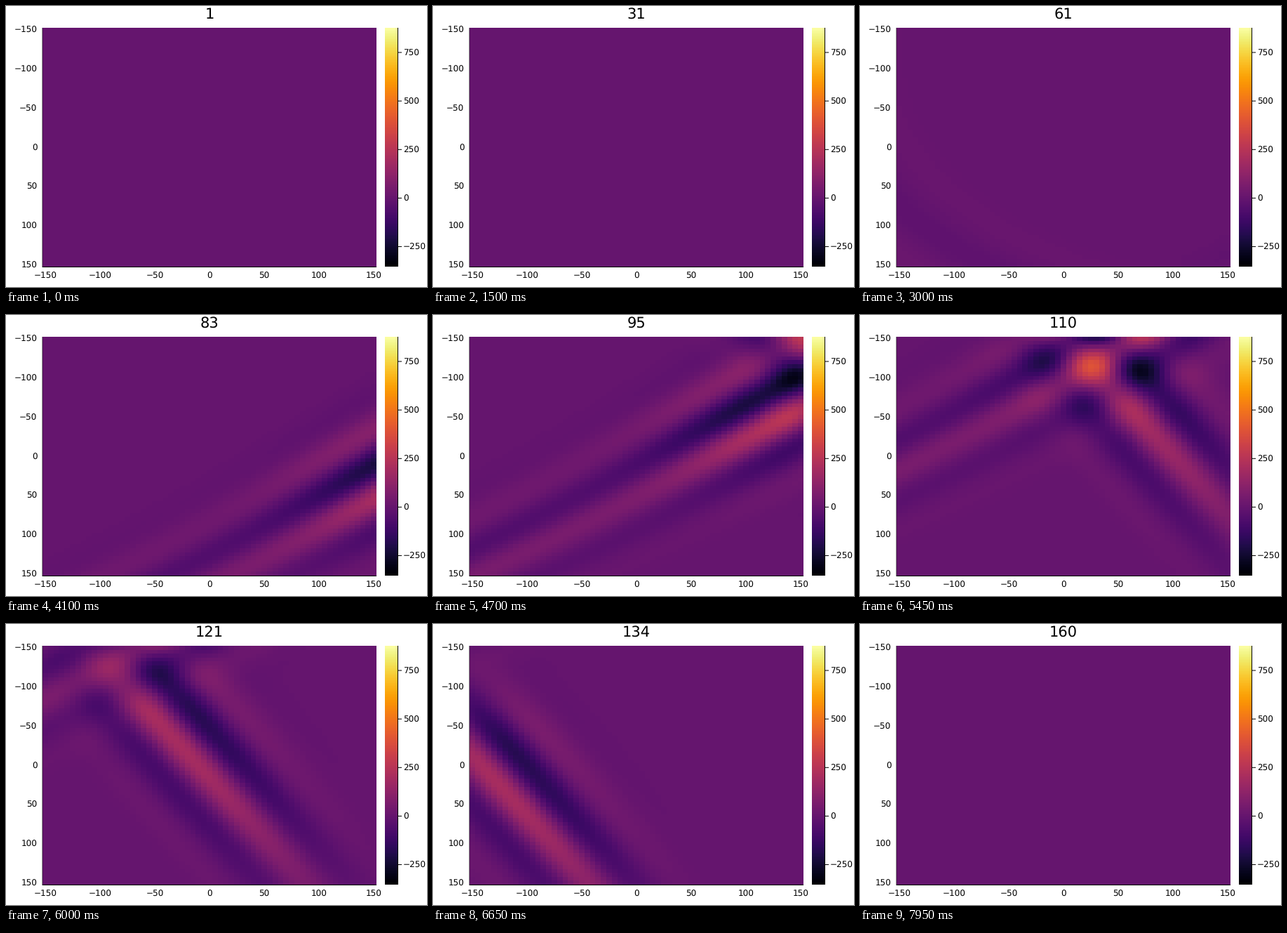
A matplotlib script for the animation above (8000 ms loop, 600x400 px).

```python
import numpy as np
import matplotlib.pyplot as plt
from matplotlib.animation import FuncAnimation

W, H, DPI = 600, 400, 100
FRAMES, STEP = 160, 50
LEFT, RIGHT, TOP, BOTTOM = 52, 528, 31, 371
HALF = 152.5
V_MIN, V_MAX = -353, 877

plt.rcParams["font.family"] = "DejaVu Sans"
plt.rcParams["text.hinting"] = "none"

grid = np.linspace(-150, 150, 61)
X, Y = np.meshgrid(grid, grid)


def gauss(u, width):
    return np.exp(-0.5 * (u / width) ** 2)


def packet(s, wavelength, shift, width):
    """Oscillating pulse along the direction of travel."""
    return np.cos(2 * np.pi * s / wavelength) * gauss(s - shift, width)


def rising_wave(n):
    # front heading up and to the left; its right arm bends as it goes
    along = 0.8 * X - 0.6 * Y
    bend = np.where(along < 0, 2e-4, 3.3e-5 * max(n - 95, 0))
    s = -0.6 * X - 0.8 * Y + 44 - 7.68 * (n - 95) - bend * along ** 2
    amp = 62 + 205 * np.exp(-((along - 150) / 110) ** 2)
    return amp * packet(s, 74 + 0.03 * along, 16, 42)


def falling_wave(n):
    # front heading down and to the left
    along = 0.555 * X + 0.832 * Y
    s = -0.832 * X + 0.555 * Y - 10 - 8.45 * (n - 121)
    width = np.where(along < -70, 90, 220)
    amp = 215 * np.exp(-((along + 70) / width) ** 2)
    return amp * packet(s, 78, -10 + 0.08 * along, 37)


def faint_wave(n):
    # weak arc leaving through the lower left corner
    r = np.hypot(X - 180, 1.15 * (Y + 120)) - 8.5 * (n - 61)
    amp = 24 * np.exp(-((n - 64) / 9) ** 2)
    return amp * np.cos(2 * np.pi * (r - 345) / 105) * gauss(r - 410, 50)


def field(n):
    return rising_wave(n) + falling_wave(n) + faint_wave(n)


fig = plt.figure(figsize=(W / DPI, H / DPI), dpi=DPI, facecolor="white")
ax = fig.add_axes([0, 0, 1, 1])
ax.axis("off")


def px(size):
    return size * 72 / DPI


def label(x, y, text, align, size=12):
    return ax.text(x, y + 0.365 * size, text, ha=align, va="baseline",
                   fontsize=px(size), color="black")


def line(xs, ys, width=1):
    ax.plot(xs, ys, color="black", lw=px(width), solid_capstyle="butt",
            snap=False)


def number(v):
    return str(v).replace("-", "\u2212")


heat = ax.imshow(field(1), cmap="inferno", vmin=V_MIN, vmax=V_MAX,
                 extent=(LEFT, RIGHT, BOTTOM, TOP), aspect="auto",
                 interpolation="nearest")
ax.imshow(np.linspace(1, 0, 256)[:, None], cmap="inferno", vmin=0, vmax=1,
          extent=(540, 558, BOTTOM, TOP), aspect="auto",
          interpolation="nearest")

line([LEFT, RIGHT], [BOTTOM + 0.5] * 2)
line([LEFT - 0.1] * 2, [TOP, BOTTOM + 1], 0.6)
for v in range(-150, 151, 50):
    part = (v + HALF) / (2 * HALF)
    label(44.5, TOP + part * (BOTTOM - TOP), number(v), "right")
    label(LEFT + part * (RIGHT - LEFT), 383.5, number(v), "center")

line([558.5] * 2, [TOP, BOTTOM])
for v in range(-250, 751, 250):
    y = BOTTOM - (v - V_MIN) / (V_MAX - V_MIN) * (BOTTOM - TOP)
    line([558, 564], [y, y])
    label(566, y, number(v), "left")

title = label(290, 10.5, "1", "center", 21)
ax.set_xlim(0, W)
ax.set_ylim(H, 0)


def draw(i):
    n = i + 1
    heat.set_data(field(n))
    title.set_text(str(n))
    return heat, title


anim = FuncAnimation(fig, draw, frames=FRAMES, interval=STEP,
                     repeat=True, repeat_delay=0)
plt.show()
```
